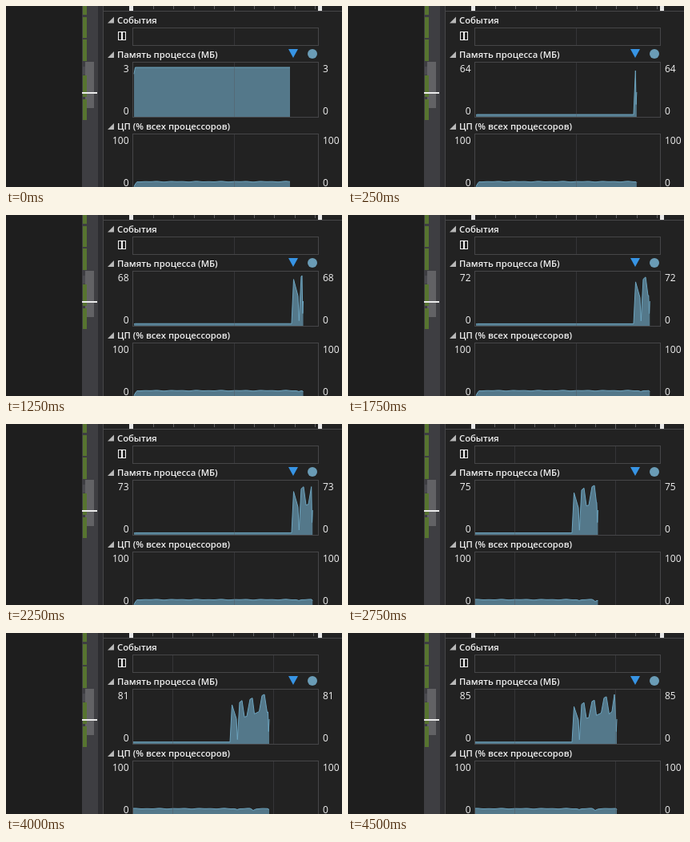
Recreate the animation shown at these times as an HTML page with a canvas. Size 420 px wide and 227 px high, loop 4750 ms.

```html
<!DOCTYPE html>
<html lang="ru">
<head>
<meta charset="utf-8">
<style>
  html, body { margin: 0; width: 100%; height: 100%; overflow: hidden; background: #1e1e1e; }
  canvas { display: block; }
</style>
</head>
<body>
<canvas id="stage" width="420" height="227"></canvas>
<script>
const ctx = document.getElementById('stage').getContext('2d');
const LOOP = 4750, STEP = 250, SCROLL_STEP = 11, SCROLL = 77;
const LEFT = 158.5, RIGHT = 390.5, GRID = 126, TICK = GRID / 5;
const FILL = '#54788a', LINE = '#6da5c0', BORDER = '#464648', TEXT = '#f1f1f1';

// Memory use: [x before scrolling, megabytes]
const memory = [
  [160, 2.6], [161.5, 3], [357, 3], [359.5, 64], [365, 41], [366.3, 7], [369, 68],
  [372, 71], [375, 44], [378, 45], [382, 73], [385, 75], [387.5, 49], [393.5, 53],
  [397, 79], [400, 81], [403.5, 51], [407, 56], [410, 85], [412, 50]
];
// Axis maximum: [first step, megabytes]
const scales = [[0, 3], [1, 64], [5, 68], [6, 72], [8, 73], [10, 75], [14, 81], [17, 85]];

const cpu = x => 220.3 + 0.45 * Math.sin(x * 0.31) * Math.sin(x * 0.083 + 1)
  + Math.max(0, 163 - x) * 2.2
  + 2.2 * Math.exp(-((x - 386) ** 2) / 4) + 1.2 * Math.exp(-((x - 366) ** 2) / 4);

function rect(x, y, w, h, color) {
  ctx.fillStyle = color;
  ctx.fillRect(x, y, w, h);
}

function frame(x, y, w, h, color) {
  ctx.strokeStyle = color;
  ctx.lineWidth = 1;
  ctx.strokeRect(x, y, w, h);
}

function shape(points, fill) {
  ctx.beginPath();
  points.forEach(p => ctx.lineTo(...p));
  ctx.closePath();
  ctx.fillStyle = fill;
  ctx.fill();
}

function text(str, x, y, align, font) {
  ctx.font = `${font} "Open Sans", "Noto Sans", sans-serif`;
  ctx.textAlign = align;
  ctx.fillStyle = TEXT;
  ctx.fillText(str, x, y);
}

function heading(str, y) {
  shape([[135, y - 8], [135, y], [127, y]], '#b8b8b8');
  text(str, 139, y, 'left', '600 11.25px');
}

function axis(value, y) {
  text(value, 153.5, y, 'right', '12px');
  text(value, 396, y, 'left', '12px');
}

function area(points, base) {
  const first = points[0], last = points[points.length - 1];
  shape([[first[0], base], ...points, [last[0], base]], FILL);
  ctx.beginPath();
  points.forEach(p => ctx.lineTo(...p));
  ctx.strokeStyle = LINE;
  ctx.lineWidth = 1;
  ctx.stroke();
}

function chart(top, height, shift, points) {
  ctx.save();
  ctx.beginPath();
  ctx.rect(LEFT, top, RIGHT - LEFT, height);
  ctx.clip();
  if (points) area(points, top + height);
  for (let x = 285 - shift; x < RIGHT; x += GRID) rect(x, top, 1, height, 'rgba(85,85,90,.38)');
  ctx.restore();
  frame(LEFT, top, RIGHT - LEFT, height, BORDER);
}

function memoryPoints(edge, max) {
  if (edge < 357) return [...memory.slice(0, 2), [edge, 3]];
  const x = Math.min(edge - 1.5, 411);
  const points = memory.filter(p => p[0] < x);
  const [x0, v0] = points[points.length - 1];
  const [x1, v1] = memory[points.length];
  const value = v0 + (v1 - v0) * (x - x0) / (x1 - x0);
  // The newest sample is still incomplete
  return [...points, [x, value], [edge - 0.7, max * 0.25], [edge, max * 0.5]];
}

function editorMargin() {
  rect(0, 0, 95, 227, '#1e1e1e');
  rect(95, 0, 20, 227, '#3e3e42');
  rect(115, 0, 6, 227, '#2d2d30');
  rect(99, 70, 11, 58, '#626265');
  [[0, 11], [14, 26], [42, 27], [87, 27], [117, 26]].forEach(([y, h]) => rect(96, y, 5, h, '#577430'));
  rect(96, 76, 3, 10, '#4b4b50');
  rect(95, 108, 19, 2, '#ececec');
}

function ruler(shift) {
  rect(121, 0, 1, 227, BORDER);
  rect(121, 6, 299, 1, BORDER);
  for (let i = -5; i < 10; i++) {
    const x = Math.round(285 - shift + i * TICK);
    if (x > 160 && x < 390) rect(x, 0, 1, i % 5 ? 4 : 6, '#606063');
  }
  rect(154, 0, 5, 6, '#e8e8e8');
  rect(390, 0, 5, 6, '#e8e8e8');
}

function draw(step) {
  const shift = step < SCROLL_STEP ? 0 : SCROLL;
  const edge = step ? 358.3 + 2.5 * step + 0.03 * step * step : 355;
  const max = scales.filter(s => s[0] <= step).pop()[1];

  rect(121, 0, 299, 227, '#222222');
  editorMargin();
  ruler(shift);

  heading('События', 21.5);
  chart(27.5, 22, shift);
  frame(140.5, 32.5, 4, 10, TEXT);
  frame(145.5, 32.5, 4, 10, TEXT);

  heading('Память процесса (МБ)', 65);
  shape([[353, 54], [365, 54], [359, 65]], '#3794e4');
  ctx.beginPath();
  ctx.arc(383, 60, 6, 0, Math.PI * 2);
  ctx.fillStyle = '#6a9cb6';
  ctx.fill();
  chart(70.5, 69, shift, memoryPoints(edge, max).map(([x, v]) => [x - shift, 139 - 62 * v / max]));
  axis(max, 83);
  axis(0, 136);

  heading('ЦП (% всех процессоров)', 155);
  const load = [];
  for (let x = 160; x < edge; x += 2) load.push([x - shift, cpu(x)]);
  load.push([edge - shift, step ? 221.5 : cpu(edge)]);
  chart(160.5, 90, shift, load);
  axis(100, 173);
  axis(0, 226);
}

function tick() {
  draw(Math.floor(performance.now() % LOOP / STEP));
  requestAnimationFrame(tick);
}
tick();
</script>
</body>
</html>
```
